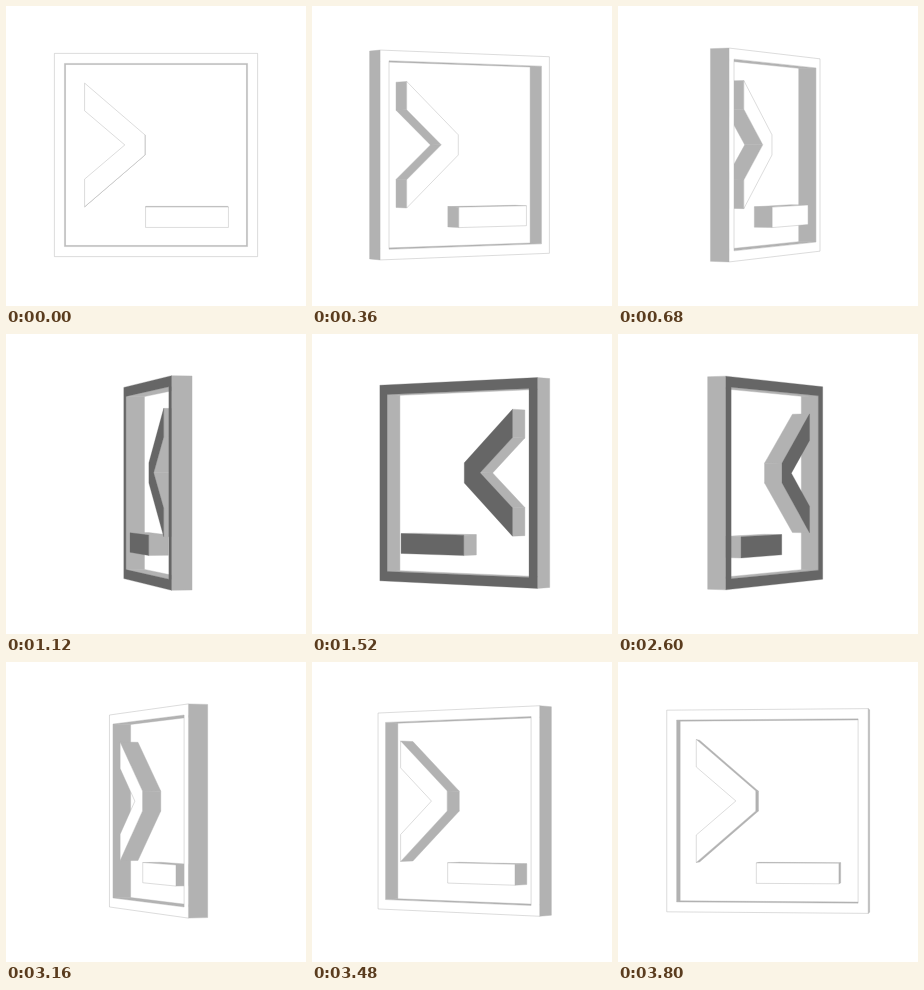
An HTML page with a canvas that plays this animation: 300 by 300 pixels, repeating every 3.84 s.

```html
<!DOCTYPE html>
<html lang="en">
<head>
<meta charset="utf-8">
<title>Rotating prompt icon</title>
<style>
  html, body { margin: 0; width: 100%; height: 100%; overflow: hidden; background: #fff; }
  canvas { display: block; }
</style>
</head>
<body>
<canvas id="stage" width="300" height="300"></canvas>
<script>
const ctx = document.getElementById('stage').getContext('2d');
const LOOP = 3840, STEP = 40;
const TURN_STEPS = 97; // the loop restarts one step before the full turn
const CENTER = { x: 150, y: 149 };
const CAMERA = 1700, HALF_DEPTH = 10;
const FRONT = '#ffffff', BACK = '#666666', WALL = '#b2b2b2';

const rect = (x0, y0, x1, y1) => [[x0, y0], [x1, y0], [x1, y1], [x0, y1]];

// Outlines run clockwise, holes counter-clockwise.
const shapes = [
  [rect(-101, -101, 101, 101), rect(-91, -91, 91, 91).reverse()],
  [[[-71, -71.5], [-11, -20], [-11, 0], [-71, 51.5], [-71, 24], [-31, -10], [-71, -44]]],
  [rect(-10.4, 51.7, 72, 72)]
];

function projector(angle) {
  const c = Math.cos(angle), s = Math.sin(angle);
  return ([x, y], z) => {
    const depth = z * c - x * s;
    const scale = CAMERA / (CAMERA - depth);
    return {
      x: CENTER.x + (x * c + z * s) * scale,
      y: CENTER.y + y * scale,
      depth
    };
  };
}

function signedArea(points) {
  return points.reduce((sum, p, i) => {
    const q = points[(i + 1) % points.length];
    return sum + p.x * q.y - q.x * p.y;
  }, 0) / 2;
}

function paint(rings, fill, stroke, lineWidth) {
  ctx.beginPath();
  for (const ring of rings) {
    ring.forEach((p, i) => i ? ctx.lineTo(p.x, p.y) : ctx.moveTo(p.x, p.y));
    ctx.closePath();
  }
  ctx.fillStyle = fill;
  ctx.fill('evenodd');
  ctx.strokeStyle = stroke;
  ctx.lineWidth = lineWidth;
  ctx.stroke();
}

function visibleWalls(project) {
  const walls = [];
  for (const ring of shapes.flat()) {
    ring.forEach((a, i) => {
      const b = ring[(i + 1) % ring.length];
      const quad = [
        project(a, HALF_DEPTH), project(a, -HALF_DEPTH),
        project(b, -HALF_DEPTH), project(b, HALF_DEPTH)
      ];
      if (signedArea(quad) > 0) {
        walls.push({ quad, depth: quad.reduce((sum, p) => sum + p.depth, 0) });
      }
    });
  }
  return walls.sort((p, q) => p.depth - q.depth);
}

function drawCaps(project, z, fill, stroke, lineWidth) {
  for (const shape of shapes) {
    const rings = shape.map(ring => ring.map(p => project(p, z)));
    if (signedArea(rings[0]) * z > 0) paint(rings, fill, stroke, lineWidth);
  }
}

function render(now) {
  const step = Math.floor((now % LOOP) / STEP);
  const project = projector(step / TURN_STEPS * Math.PI * 2);
  ctx.fillStyle = '#fff';
  ctx.fillRect(0, 0, 300, 300);
  for (const { quad } of visibleWalls(project)) paint([quad], WALL, WALL, 0.4);
  drawCaps(project, -HALF_DEPTH, BACK, BACK, 0.3);
  drawCaps(project, HALF_DEPTH, FRONT, WALL, 0.45);
  requestAnimationFrame(render);
}
requestAnimationFrame(render);
</script>
</body>
</html>
```
